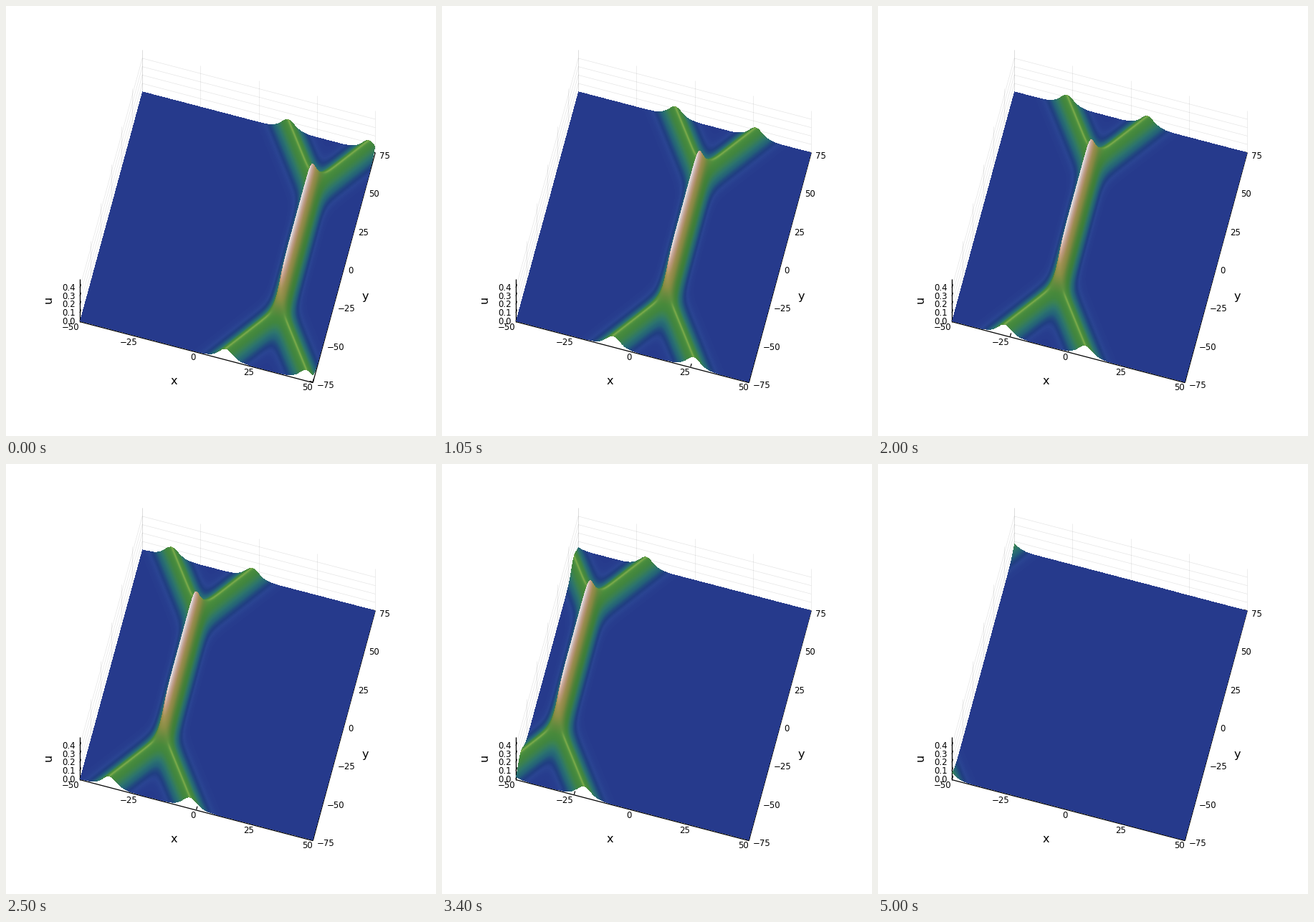
Animation of 600 by 600 pixels, one loop 5.05 s. Source, as a matplotlib script:

```python
import numpy as np
import matplotlib.pyplot as plt
from matplotlib.animation import FuncAnimation
from matplotlib.collections import LineCollection

SIZE, FRAMES, STEP = 600, 101, 50
ORIGIN = np.array([103.2, 439.7])      # screen place of x=-50, y=-75, u=0
EX = np.array([3.25, 0.85])            # pixels per unit of x
EY = np.array([0.58, -2.133])          # pixels per unit of y
EZ = 117.0                             # pixels per unit of u
ZMAX = 0.5
STEM = 20.2                            # sets the length of the tall stem
START = 29.9                           # centre of the wave at the first frame
LEFT, RIGHT, TOP, BOTTOM = 100, 520, 50, 530

plt.rcParams["font.family"] = "DejaVu Sans"


def project(x, y, z=0.0):
    p = ORIGIN + EX * (x + 50) + EY * (y + 75)
    return p[0], p[1] - EZ * z


# sample points of the floor on screen, ordered back to front
rows = np.arange(TOP, BOTTOM, 0.25)
cols = np.arange(LEFT, RIGHT) + 0.5
Q, P = np.meshgrid(rows, cols, indexing="ij")
det = EX[0] * EY[1] - EY[0] * EX[1]
dx, dy = P - ORIGIN[0], Q - ORIGIN[1]
X = (dx * EY[1] - EY[0] * dy) / det - 50
Y = (EX[0] * dy - EX[1] * dx) / det - 75
inside = (abs(X) <= 50) & (abs(Y) <= 75)
X, Y, Q = X[inside], Y[inside], Q[inside]
COL = (P[inside] - LEFT).astype(int)

GROW = np.exp((X - START) / 2)
MID = 2 * np.exp(-STEM / 2) * np.cosh(Y / 4)
MID_Y = 0.5 * np.exp(-STEM / 2) * np.sinh(Y / 4)

STOPS = [
    (0.000, 38, 58, 140), (0.003, 42, 68, 146), (0.007, 32, 62, 130),
    (0.020, 36, 98, 122), (0.040, 46, 120, 112), (0.065, 60, 134, 86),
    (0.090, 68, 140, 66), (0.125, 76, 145, 62), (0.180, 104, 148, 66),
    (0.250, 148, 154, 74), (0.333, 178, 160, 92), (0.400, 210, 170, 138),
    (0.450, 226, 194, 180), (0.480, 236, 220, 220), (0.500, 232, 226, 230),
]
stops = np.array(STOPS, float)
levels = np.linspace(0, ZMAX, 1024)
LUT = np.stack([np.interp(levels, stops[:, 0], stops[:, k]) for k in (1, 2, 3)], axis=1)
GLINT = np.array([46.0, 24.0, 12.0])   # light added along the crests


def wave(frame):
    """Height and upward part of the normal of the two-soliton surface."""
    e = GROW * np.exp(frame / 2)
    c, s = (e + 1 / e) / 2, (e - 1 / e) / 2
    tau = 2 * c + MID
    u = (2 + MID * c) / tau**2
    cube = tau * tau * tau
    ux = s / 2 * (MID**2 - 2 * MID * c - 8) / cube
    uy = MID_Y * (2 * c**2 - MID * c - 4) / cube
    up2 = 1 / (1 + (36 * ux) ** 2 + (53 * uy) ** 2)
    return u, np.sqrt(up2)


def render(frame):
    u, up = wave(frame)
    index = np.clip(u / ZMAX * 1023, 0, 1023).astype(int)
    color = LUT[index] * (0.85 + 0.15 * up)[:, None]
    crest = np.flatnonzero((u > 0.08) & (up > 0.8))
    shine = up[crest] ** 16 * np.minimum(u[crest] / 0.125, 1) ** 2
    color[crest] += shine[:, None] * GLINT
    img = np.zeros((BOTTOM - TOP, RIGHT - LEFT, 4), np.uint8)
    row = np.floor(Q - EZ * u).astype(int) - TOP
    rgba = np.full((len(u), 4), 255, np.uint8)
    rgba[:, :3] = np.minimum(color + 0.5, 255)
    # later, nearer samples cover earlier ones
    img[row, COL] = rgba
    return img


fig = plt.figure(figsize=(6, 6), dpi=100, facecolor="white")
ax = fig.add_axes([0, 0, 1, 1])
ax.axis("off")

xticks = range(-50, 51, 25)
yticks = range(-75, 76, 25)
zticks = [0.0, 0.1, 0.2, 0.3, 0.4]

# faint grid on the two back walls
grid = [[project(x, 75), project(x, 75, ZMAX)] for x in xticks]
grid += [[project(-50, y), project(-50, y, ZMAX)] for y in yticks]
for z in zticks:
    grid.append([project(-50, -75, z), project(-50, 75, z), project(50, 75, z)])
ax.add_collection(LineCollection(grid, colors="black", alpha=0.1, linewidths=0.5, zorder=1))

# axis lines with inward ticks
tick_y = EY * 2.1
tick_x = -EX * 1.4


def tick(p, d):
    return [p, (p[0] + d[0], p[1] + d[1])]


lower = np.array([0.0, 0.9])
axes_lines = [
    [project(-50, -75) + lower, project(50, -75) + lower],
    [project(50, -75) + lower, project(50, 75)],
    [project(-50, -75) + lower, project(-50, -75, ZMAX)],
]
axes_lines += [tick(project(x, -75), tick_y) for x in xticks]
axes_lines += [tick(project(50, y), tick_x) for y in yticks]
axes_lines += [tick(project(-50, -75, z), tick_y) for z in zticks]
ax.add_collection(LineCollection(axes_lines, colors="black", linewidths=0.9, zorder=2))


def number(x, y, text, ha):
    text = text.replace("-", "\u2212")
    ax.text(x, y + 4.3, text, ha=ha, va="baseline", fontsize=8.5, zorder=5)


for x in xticks:
    px, py = project(x, -75)
    number(px - 0.8, py + 7.5, str(x), "right")
for y in yticks:
    px, py = project(50, y)
    number(px + 5.4, py + 3.9, str(y), "left")
for z in zticks:
    px, py = project(-50, -75, z)
    number(px - 6.6, py - 0.3, f"{z:.1f}", "right")

guide = dict(fontsize=11.6, ha="center", va="baseline", zorder=5)
ax.text(234.5, 527.5, "x", **guide)
ax.text(501.3, 410, "y", **guide)
ax.text(64, 409.7, "u", rotation=90, rotation_mode="anchor", **guide)

surface = ax.imshow(render(0), extent=(LEFT, RIGHT, BOTTOM, TOP), aspect="auto",
                    interpolation="nearest", zorder=3)
ax.set_xlim(0, SIZE)
ax.set_ylim(SIZE, 0)


def draw(frame):
    surface.set_data(render(frame))
    return [surface]


anim = FuncAnimation(fig, draw, frames=FRAMES, interval=STEP, repeat=True)
plt.show()
```
